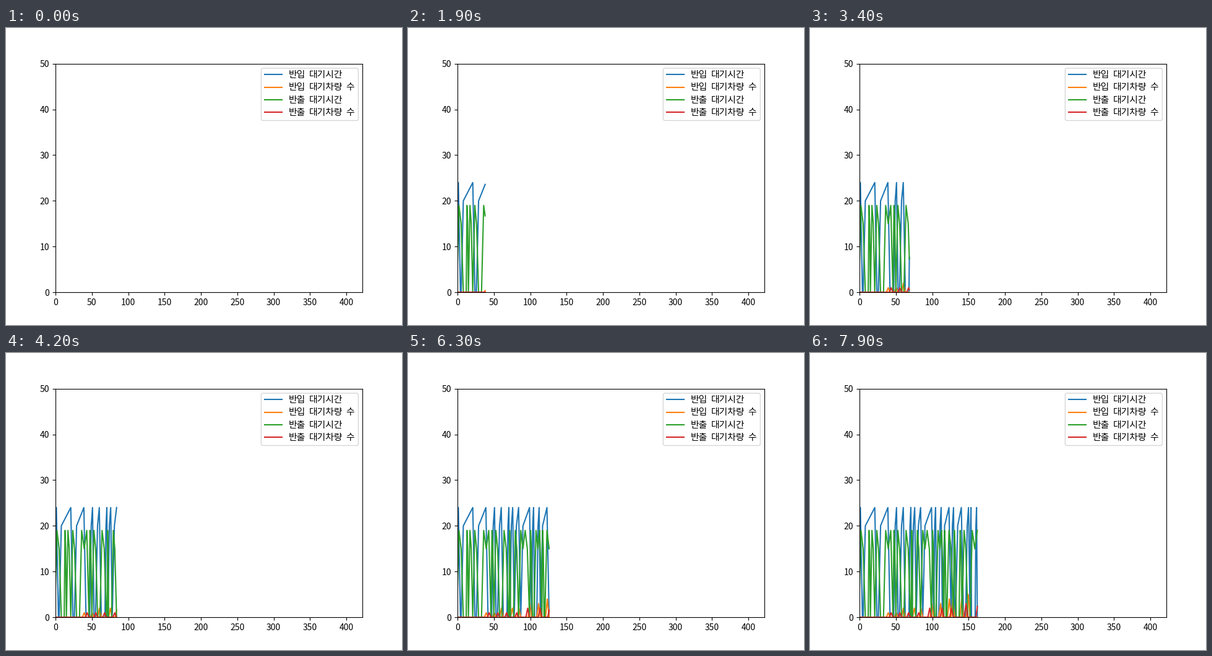
A matplotlib script for the animation above (8 s loop, 640 px wide and 480 px high).

```python
import numpy as np
import matplotlib.pyplot as plt
from matplotlib.animation import FuncAnimation
from matplotlib.lines import Line2D
from matplotlib.patches import FancyBboxPatch

plt.rcParams["font.family"] = "Noto Sans CJK JP"
W, H, DPI = 640, 480, 100
STEPS = 80

# Spans of time in which trucks are waiting
in_busy = [(-4, 4), (5, 24), (26, 42), (47, 53), (55, 63), (68, 72), (72, 78),
           (78, 87), (87, 102), (102, 106), (109, 114), (114, 126),
           (126, 131), (132, 143), (146, 152), (152, 154), (159, 162)]
out_busy = [(-1, 8), (12, 15), (15, 21), (21, 29), (33, 46), (46, 50), (50, 58),
            (61, 70), (71, 73), (77, 84), (84, 99), (99, 103), (105, 116),
            (116, 119), (120, 129), (129, 133), (137, 141), (141, 149), (152, 165)]


def ramp(n):
    return np.linspace(20, 24, n)


def zigzag(n):
    return np.where(np.arange(n) % 2, 15, 19)


def waits(spans, levels):
    """Steep rise, a top shaped by levels(n), steep fall."""
    x, y = [], []
    for a, b in spans:
        slope = min(3, 0.35 * (b - a))
        n = 1 + max(1, round((b - a - 2 * slope) / 3))
        x += [a, *np.linspace(a + slope, b - slope, n), b]
        y += [0, *levels(n), 0]
    return np.array(x), np.array(y)


def queue(spans, pace):
    """A spike near the end of each longer span, higher as time goes on."""
    x, y = [0], [0]
    for a, b in spans:
        if a >= 0 and b - a >= 5:
            x += [b - 5, b - 2.5, b]
            y += [0, b // pace, 0]
    return np.array(x), np.array(y)


series = [("반입 대기시간", "C0", waits(in_busy, ramp)),
          ("반입 대기차량 수", "C1", queue(in_busy, 30)),
          ("반출 대기시간", "C2", waits(out_busy, zigzag)),
          ("반출 대기차량 수", "C3", queue(out_busy, 45))]

fig, ax = plt.subplots(figsize=(W / DPI, H / DPI), dpi=DPI)
ax.set_xlim(0, 422)
ax.set_ylim(0, 50)
lines = [ax.plot([], [], color=color, lw=1.5)[0] for _, color, _ in series]


def add_legend():
    # Overlay in pixels, y downwards
    box = fig.add_axes([0, 0, 1, 1])
    box.set(xlim=(0, W), ylim=(H, 0))
    box.axis("off")
    box.add_patch(FancyBboxPatch((412.4, 65), 157, 84.5, lw=1,
                                 boxstyle="round,pad=0,rounding_size=2.8",
                                 fc="white", ec="0.8", alpha=0.8))
    for i, (label, color, _) in enumerate(series):
        y = 75.2 + 20.4 * i
        box.add_line(Line2D([417.9, 445.7], [y, y], color=color, lw=1.5))
        for x, word in zip((456.7, 489.7, 549.2), label.split()):
            box.text(x, y + 4.8, word, fontsize=10.7, va="baseline")


def draw(step):
    end = np.interp(step, [1, 11, 27, 42, 55, 63, 79],
                    [0, 21, 55, 84, 109, 126, 162])
    for line, (_, _, (x, y)) in zip(lines, series):
        past = x < end
        line.set_data(np.append(x[past], end),
                      np.append(y[past], np.interp(end, x, y)))
        line.set_visible(step > 1)
    return lines


add_legend()
anim = FuncAnimation(fig, draw, frames=STEPS, interval=100,
                     repeat=True, repeat_delay=0)
plt.show()
```
